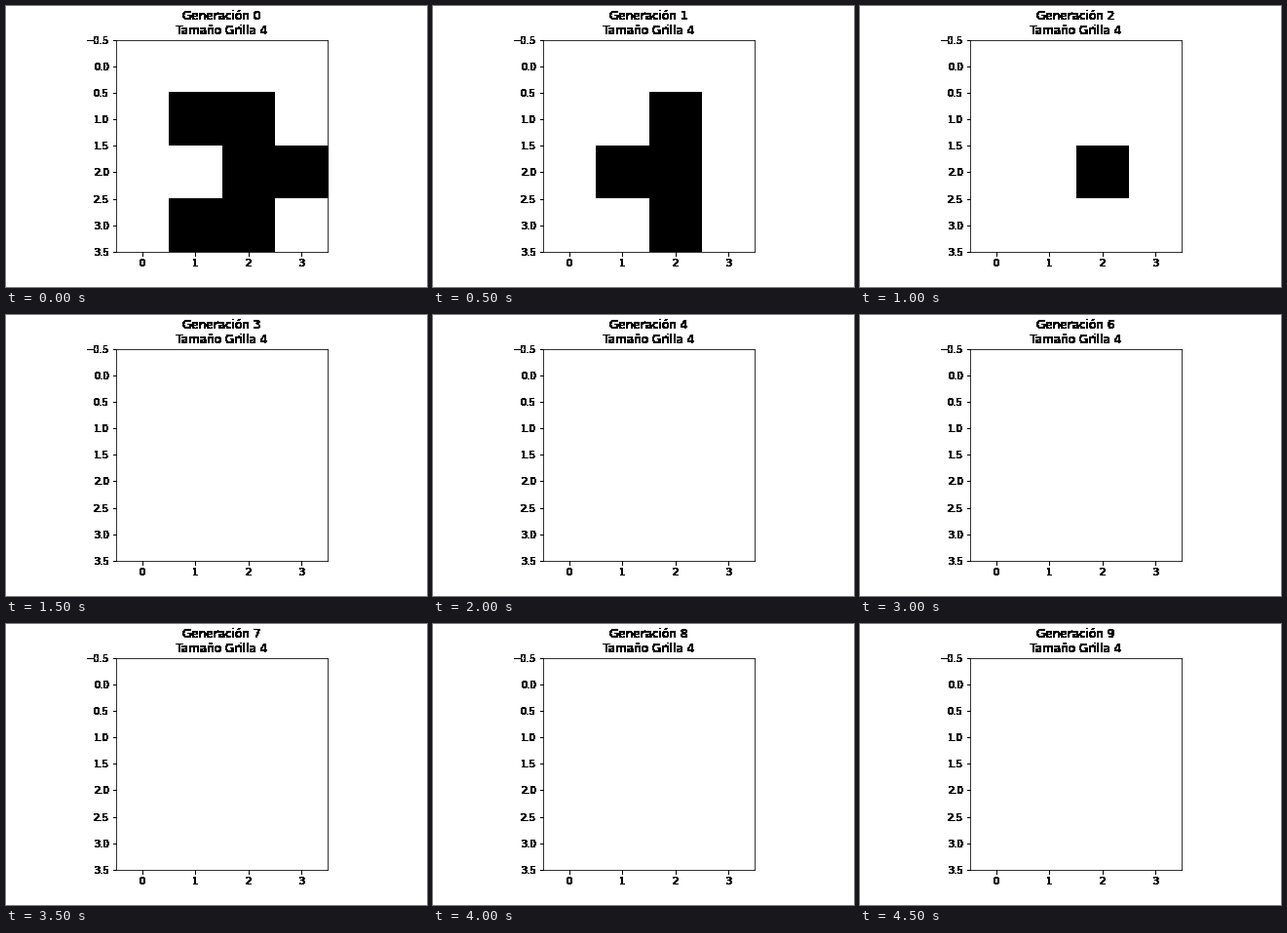
Write a matplotlib script that moves like this. It is 432 by 288 pixels and loops after 5 s.

```python
import numpy as np
import matplotlib.pyplot as plt
from matplotlib.animation import FuncAnimation

SIZE, STEPS = 4, 10

plt.rcParams.update({
    "font.family": "DejaVu Sans",
    "font.size": 10,
    "figure.subplot.bottom": 0.125,
})


def harden(img, dpi):
    """Make every touched pixel fully opaque, for crisp heavy glyphs."""
    img = img.copy()
    img[..., 3] = img[..., 3] > 0
    return img, 0, 0


def evolve(grid):
    """Life rule counting only the four orthogonal neighbours."""
    p = np.pad(grid, 1)
    n = p[:-2, 1:-1] + p[2:, 1:-1] + p[1:-1, :-2] + p[1:-1, 2:]
    return ((n == 3) | ((n == 2) & (grid == 1))).astype(int)


start = np.array([[0, 0, 0, 0],
                  [0, 1, 1, 0],
                  [0, 0, 1, 1],
                  [0, 1, 1, 0]])
history = [start]
for _ in range(STEPS - 1):
    history.append(evolve(history[-1]))

fig, ax = plt.subplots(figsize=(6, 4), dpi=72)
board = ax.imshow(start, cmap="binary", vmin=0, vmax=1)
ax.set_xticks(range(SIZE))
ax.set_yticks(np.arange(-0.5, SIZE, 0.5))
ax.set_ylim(SIZE - 0.5, -0.5)
title = ax.set_title("")

title.set_agg_filter(harden)
for axis in (ax.xaxis, ax.yaxis):
    for part in axis.get_ticklabels() + axis.get_ticklines():
        part.set_agg_filter(harden)


def update(i):
    board.set_data(history[i])
    title.set_text(f"Generación {i}\nTamaño Grilla {SIZE}")
    return board, title


anim = FuncAnimation(fig, update, frames=STEPS, interval=500,
                     repeat=True, repeat_delay=0, blit=False)
plt.show()
```
